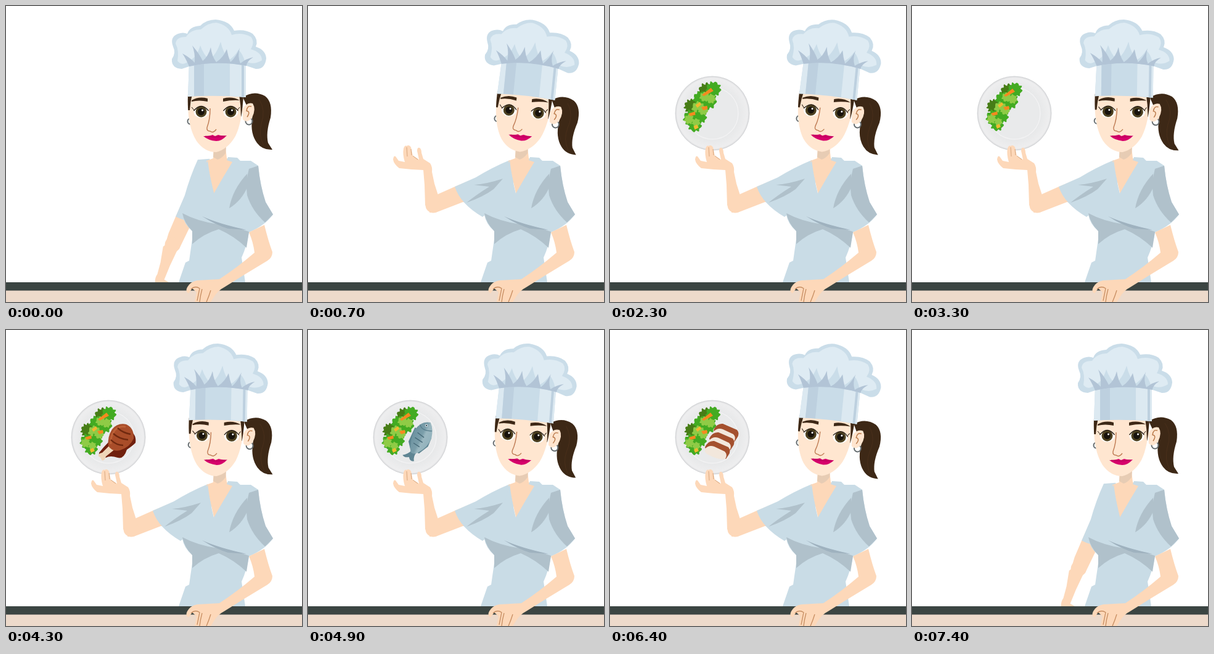
These frames come from a looping animation (480 by 480 pixels, 8 s). An HTML page:

```html
<!DOCTYPE html>
<html lang="en">
<head>
<meta charset="utf-8">
<title>Chef with plate</title>
<style>
html, body { margin: 0; width: 100%; height: 100%; overflow: hidden; background: #fff; }
svg { display: block; width: 100%; height: 100%; }
</style>
</head>
<body>
<svg viewBox="0 0 480 480">
  <defs>
    <radialGradient id="china"><stop offset=".7" stop-color="#e7e8e9"/><stop offset=".95" stop-color="#eeeeef"/><stop offset="1" stop-color="#d9dadc"/></radialGradient>
    <linearGradient id="scales" x1="0" y1="0" x2="1" y2=".7"><stop offset=".2" stop-color="#6b919f"/><stop offset=".55" stop-color="#7b9eaa"/><stop offset=".65" stop-color="#9bb8c1"/><stop offset="1" stop-color="#8eafba"/></linearGradient>
    <clipPath id="faceClip"><path id="face" d="M295 143C294 174 297 200 309 219Q322 237 341 237Q360 232 372 211Q383 189 385 143Z"/></clipPath>
  </defs>

  <g id="plate">
    <circle cx="166" cy="174" r="60" fill="url(#china)" stroke="#cfd0d2" stroke-width=".8"/>
    <circle cx="166" cy="174" r="42" fill="#e9eaeb" stroke="#f3f3f4" stroke-width="1.4"/>
    <g id="salad"></g>
    <g id="meat">
      <path d="M201 163Q212 170 210 183Q205 188 196 194Q191 210 181 207Q169 203 162 207Q149 209 151 199Q158 190 167 181Z" fill="#70200d"/>
      <path d="M170 185L156 199Q149 200 150 205Q154 206 155 211Q160 213 162 205L177 193Z" fill="#efd5b8"/>
      <path d="M166 188Q164 174 172 161Q181 150 195 153Q208 159 207 176Q201 190 185 195Q172 198 166 188Z" fill="#a94d29"/>
      <path d="M170 185Q169 173 176 163Q184 155 194 157" fill="none" stroke="#bd6137" stroke-width="3"/>
      <path d="M181 159Q190 167 202 169M174 168Q184 177 198 178M170 178Q179 187 190 187" fill="none" stroke="#70290f" stroke-width="2.4"/>
    </g>
    <g id="fish">
      <path d="M165 199Q158 206 147 208Q151 214 160 212Q162 222 170 220Q168 211 175 203Z" fill="#5f8593"/>
      <path d="M172 153L159 181L163 198L180 205L198 191L205 174Z" fill="#5d8492"/>
      <path d="M203 143Q185 139 172 157Q161 177 163 202Q167 208 178 203Q198 193 205 174Q209 156 203 143Z" fill="url(#scales)"/>
      <path d="M182 147Q185 160 206 160" fill="none" stroke="#587d8b" stroke-width="1.5"/>
      <path d="M177 163L190 173M172 173L187 183M169 184L181 192" fill="none" stroke="#486b79" stroke-width="1.8"/>
      <circle cx="195" cy="149" r="2.7" fill="#e5edf0"/><circle cx="195" cy="149" r="1.5" fill="#243943"/>
    </g>
    <g id="chicken"></g>
  </g>

  <g id="arm">
    <path d="M262 283L238 293L211 305L199 312L197 335L207 335L251 318L280 320Z" fill="#fdd8b9"/>
    <circle cx="203" cy="323" r="12.5" fill="#fdd8b9"/>
    <g id="forearm">
      <path d="M190 323L189 290L187 266L168 265L148 263Q139 256 138 249Q139 242 142 244L147 251L157 253Q153 240 155 231Q157 225 160 227Q164 224 167 229L170 243L180 249L177 235Q177 229 181 230Q184 232 184 238L187 248L198 255Q202 261 201 269L205 288L213 313L203 334Z" fill="#fdd8b9"/>
      <path d="M160 229L161 244M167 232L168 242M170 243L178 249" fill="none" stroke="#d9a77e" stroke-width="1"/>
    </g>
    <path d="M342 262L327 250Q300 261 272 278L238 293Q247 321 283 342L305 325L328 300Z" fill="#c9dce6"/>
    <path id="fold" d="M316 280Q288 289 269 290L294 293Q273 306 257 319Q285 309 301 297Z" fill="#b0c1cb"/>
  </g>

  <path d="M337 229L356 229L358 247L368 252L338 307L325 251L336 247Z" fill="#fdd8b9"/>
  <path d="M337 231L357 229L356 239Q350 247 343 249L336 245Z" fill="#e7ccb4"/>

  <path d="M327 250Q331 281 337 304Q351 279 367 253L358 250L360 245L375 246L380 251L397 251L409 259Q412 291 421 318L433 338Q420 356 394 367Q391 388 382 408L388 448H280L291 416L297 413L302 378V365Q289 354 286 339L311 301L320 275Z" fill="#c9dce6"/>
  <g fill="#b0c1cb">
    <path d="M394 264L409 259Q412 291 421 318L433 338L420 351Q399 332 391 307Q388 286 394 264Z"/>
    <path d="M391 272Q367 298 362 328Q383 315 392 292Z"/>
    <path d="M286 336Q310 349 344 354Q372 358 394 366L390 392Q370 373 345 362Q321 369 302 386V365Q289 352 286 336Z"/>
    <path d="M318 341Q344 353 390 363L360 361Q340 355 318 341Z" fill="#9fb2bf"/>
  </g>

  <g id="head">
    <path d="M384 148Q402 136 420 146Q433 156 429 181Q421 206 425 222L432 233Q416 234 407 222Q396 207 399 184Q401 169 391 163Z" fill="#3d2816"/>
    <path d="M410 151Q422 168 414 191Q409 210 418 226" fill="none" stroke="#492f1b" stroke-width="1"/>
    <g fill="none" stroke="#666d70" stroke-width="2"><circle cx="394" cy="187" r="5.5"/><circle cx="299" cy="187" r="4.5"/></g>
    <path d="M383 168Q390 155 400 158Q406 167 399 181Q391 191 384 184Z" fill="#ffe5cf"/>
    <path d="M398 163Q391 161 390 170Q397 171 391 180" fill="none" stroke="#b87848" stroke-width="1.4"/>
    <use href="#face" fill="#ffe6d0"/>
    <path clip-path="url(#faceClip)" d="M294 143H302Q299 155 298 169H294ZM378 143H387V182L381 179Q381 161 378 143Z" fill="#3d2816"/>
    <g fill="#3d2816">
      <path d="M301 153Q313 146 327 150V155Q313 152 301 155Z"/><path d="M352 150Q367 146 379 153Q366 152 352 155Z"/>
    </g>
    <g id="eyes"></g>
    <path d="M331 166Q331 184 326 197Q325 203 331 203Q336 207 341 200" fill="none" stroke="#bd7951" stroke-width="1.4"/>
    <path d="M320 211Q329 211 335 209L339 211L344 209Q350 211 358 210Q350 219 341 219Q328 218 320 211Z" fill="#d6006b"/>
    <path d="M323 211Q338 214 355 211" fill="none" stroke="#a8004f" stroke-width=".8"/>
    <path d="M297 92H389V148Q342 144 295 147Z" fill="#c9dce8"/>
    <path d="M297 92H305V146L295 147ZM363 92H389V148L363 146Z" fill="#dce9f1"/>
    <path d="M305 92H321V145.500L305 146ZM382 92H386V148L382 147.500Z" fill="#bdd0df"/>
    <path d="M285 102Q268 101 269 86Q276 76 271 66Q265 50 279 45Q287 42 294 45Q298 33 315 32Q325 22 340 22Q363 24 370 40Q388 37 400 45Q410 55 405 66Q421 71 422 85Q420 103 405 102L390 97Q342 88 297 98Z" fill="#cadde9"/>
    <path d="M278 89Q281 72 275 61Q276 50 292 50Q300 38 316 38Q328 27 341 27Q361 31 366 47Q382 42 397 50Q404 58 397 70Q415 75 415 88Q401 97 387 89Q384 78 377 71Q370 83 362 87Q352 76 348 58Q341 80 329 87Q320 78 315 64Q309 84 298 88Q286 99 278 89Z" fill="#deebf3"/>
    <path d="M297 98Q291 84 286 77Q299 84 306 92Q307 76 302 64Q314 78 319 89Q328 82 332 67Q334 82 341 91Q352 84 358 70Q360 81 364 91Q373 83 379 68Q375 82 380 93Q390 85 401 83Q390 90 390 97Q342 88 297 98Z" fill="#b2c4d6"/>
  </g>

  <path d="M0 448H480V462H0Z" fill="#3b4542"/>
  <path d="M0 461.500H480V480H0Z" fill="#eddacb"/>
  <path d="M394 367L419 355Q425 380 432 399Q432 408 424 413L386 436L354 456Q344 461 337 472L332 480H306L309 464L302 458L296 466Q290 463 294 456Q299 447 310 445L346 443Q375 424 403 400Q401 383 394 367Z" fill="#fdd8b9"/>
  <path d="M300 459Q307 453 314 458L310 478M318 459Q315 470 314 480M332 461Q329 471 325 480" fill="none" stroke="#c78e62" stroke-width="1.3"/>
</svg>
<script>
const $ = id => document.getElementById(id);

// Wavy-edged leaf outline
function leaf([x, y, r, fill, lobes]) {
  let d = '';
  for (let i = 0; i < 48; i++) {
    const a = i * Math.PI / 24;
    const q = r * (1 + .13 * Math.sin(lobes * a) + .06 * Math.cos((lobes + 4) * a));
    d += (i ? 'L' : 'M') + (x + q * Math.cos(a)).toFixed(1) + ' ' + (y + q * Math.sin(a)).toFixed(1);
  }
  return `<path d="${d}Z" fill="${fill}"/>`;
}
const dark = '#477d16', green = '#43ab22', light = '#8fcb46';
$('salad').innerHTML = [
  [157, 140, 13, dark, 11], [133, 163, 11, dark, 11], [167, 136, 11, green, 9],
  [147, 151, 11, green, 9], [133, 181, 12, green, 9], [138, 192, 10, green, 8],
  [158, 154, 13, green, 9], [153, 148, 7, light, 7], [143, 165, 9, light, 7],
  [129, 183, 7, light, 7], [146, 179, 10, green, 9], [163, 151, 7, light, 7],
  [140, 188, 6, light, 7], [151, 169, 7, light, 7]
].map(leaf).join('') +
  '<path d="M149 145L163 134L167 139L152 147ZM128 174L138 171L139 176L131 178ZM148 164L157 162L158 167L151 169Z" fill="#f58a1f"/>' +
  '<path d="M139 161L146 156L148 160L142 165ZM136 194L141 191L144 196L138 199Z" fill="#f2b92f"/>';

const slice = (x, y) => `<g transform="translate(${x} ${y})">
  <path d="M-20 -2Q-15 -13 -5 -12L18 -2Q23 4 18 11L14 17Q5 15 -17 6Z" fill="#a4502e"/>
  <path d="M-20 1Q-14 -6 -5 -3L12 5Q17 10 13 17Q5 20 -13 11Q-22 7 -20 1Z" fill="#f2e7dc"/></g>`;
$('chicken').innerHTML = slice(188, 164) + slice(181, 178) + slice(174, 192);

const eye = x => `<ellipse cx="${x}" cy="172" rx="12" ry="9.500" fill="#fff"/>
  <circle cx="${x}" cy="171.500" r="9" fill="#4c4020"/><circle cx="${x}" cy="171.500" r="5.500" fill="#17120c"/>
  <circle cx="${x + 2}" cy="169" r="1.500" fill="#fff"/>
  <path d="M${x - 12} 170Q${x} 155 ${x + 12} 170" fill="none" stroke="#251a11" stroke-width="1.300"/>`;
$('eyes').innerHTML = eye(316.5) + eye(364.5) + '<path d="M305 169L301 164M376 168L379 164" stroke="#251a11" stroke-width="1"/>';

const ramp = (t, a, b) => Math.min(1, Math.max(0, (t - a) / (b - a)));
const ease = (t, a, b) => { const p = ramp(t, a, b); return p * p * (3 - 2 * p); };
const pop = (t, a, b) => {
  const p = ramp(t, a, b) - 1;
  return 1 + 2.2 * p * p * p + 1.2 * p * p;
};
const turn = (id, deg, x, y, dx = 0) => $(id).setAttribute('transform', `translate(${dx} 0) rotate(${deg} ${x} ${y})`);
function scale(id, s, x, y) {
  $(id).setAttribute('display', s > .01 ? 'inline' : 'none');
  $(id).setAttribute('transform', `translate(${x} ${y}) scale(${s}) translate(${-x} ${-y})`);
}

function draw(t) {
  const tilt = ease(t, 100, 700) - .85 * ease(t, 2800, 3300) + .85 * ease(t, 4500, 5100) - ease(t, 6700, 7400);
  const lift = ease(t, 100, 700) - ease(t, 6800, 7400);
  turn('head', 5.7 * tilt, 347, 241, 2.3 * tilt);
  turn('arm', -43 * (1 - lift), 318, 270);
  turn('forearm', -110 * (1 - lift), 202, 322);
  $('fold').setAttribute('opacity', lift);
  scale('plate', pop(t, 700, 1200) * (1 - ease(t, 6700, 7100)), 166, 174);
  scale('salad', pop(t, 1800, 2700), 148, 165);
  scale('meat', pop(t, 3600, 4300) * (1 - ease(t, 4400, 4800)), 183, 180);
  scale('fish', pop(t, 4700, 5400) * (1 - ease(t, 5400, 5800)), 180, 180);
  scale('chicken', pop(t, 5700, 6400), 181, 180);
}

const start = performance.now();
function tick() {
  const t = (performance.now() - start) % 8000;
  draw(Math.floor(t / 100) * 100);
  requestAnimationFrame(tick);
}
tick();
</script>
</body>
</html>
```
